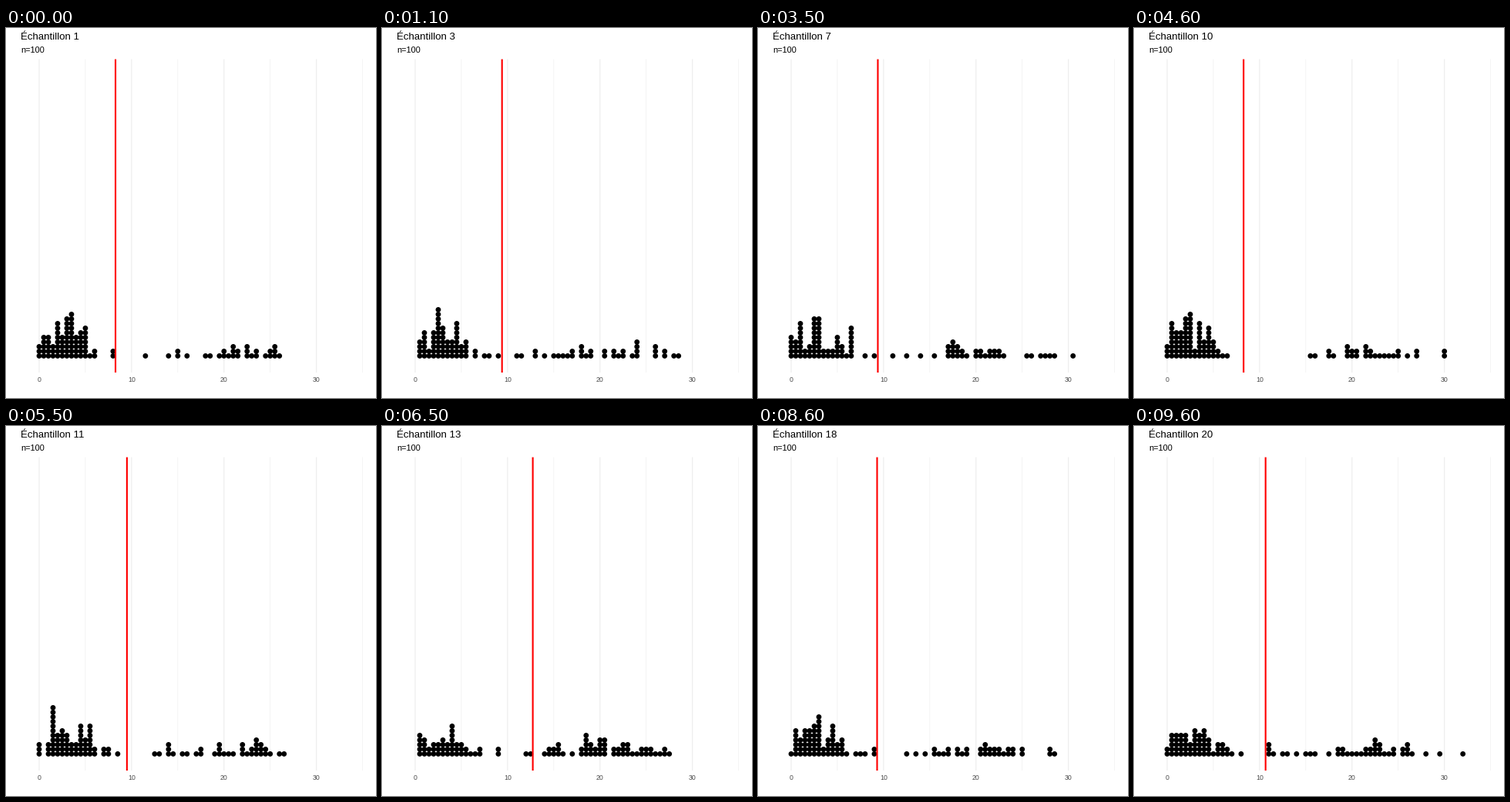
Animation, 480 px wide and 480 px high, one loop 10000 ms. Source, as a matplotlib script:

```python
import numpy as np
import matplotlib.pyplot as plt
from matplotlib.animation import FuncAnimation
from matplotlib.collections import PatchCollection
from matplotlib.patches import Circle

SIZE, DPI = 480, 100
PX = 72 / DPI                      # points per pixel
TOP, BOTTOM = 40.5, 447            # panel edges
BIN = 0.5                          # width of one dot column
DOT_STEP, DOT_RADIUS = 5.995, 3.4
FIRST_ROW = 425.4
FRAMES, HOLD = 100, 5              # frames per loop, frames per sample

MEANS = [8.26, 9.9, 9.4, 9.1, 8.63, 9.6, 8.9, 9.38, 9.8, 8.27,
         9.2, 9.5, 10.2, 12.73, 10.4, 10.52, 9.7, 9.3, 10.0, 10.65]


def x_px(value):
    return 43 + 11.99 * value


def draw_sample(number):
    """100 values in two groups, near 3 and near 20, with the wanted mean."""
    rng = np.random.default_rng(number)
    mean = MEANS[number - 1]
    n_low = round(100 * (20.3 - mean) / 17)
    low = np.minimum(np.abs(rng.normal(3, 2.4, n_low)), 9)
    high = rng.normal(20, 4.5, 100 - n_low)
    high += (100 * mean - low.sum()) / len(high) - high.mean()
    return np.r_[low, np.clip(high, 11, 33)]


def stack_dots(values):
    """Pile the values up in columns, one circle per value."""
    columns, counts = np.unique(np.rint(values / BIN), return_counts=True)
    return [Circle((x_px(column * BIN), FIRST_ROW - DOT_STEP * row), DOT_RADIUS)
            for column, count in zip(columns, counts) for row in range(count)]


stacks = [stack_dots(draw_sample(i + 1)) for i in range(len(MEANS))]

fig = plt.figure(figsize=(SIZE / DPI, SIZE / DPI), dpi=DPI, facecolor="white")
ax = fig.add_axes([0, 0, 1, 1])
ax.set(xlim=(0, SIZE), ylim=(SIZE, 0))
ax.axis("off")


def vline(x, width, color, z):
    return ax.plot([x, x], [TOP, BOTTOM], color=color, lw=width * PX, zorder=z,
                   solid_capstyle="butt", snap=False)[0]


def label(x, y, text, size, color="black", ha="left"):
    return ax.text(x, y, text, fontsize=size * PX, color=color, ha=ha,
                   va="baseline", family="Liberation Sans")


for tick in range(0, 36, 5):
    major = tick % 10 == 0
    vline(x_px(tick), 1.07 if major else 0.53, "#EBEBEB", 1)
    if major:
        label(x_px(tick), 459, str(tick), 8.8, "#4D4D4D", "center")

title = label(18.9, 15, "", 13.2)
label(18.8, 32, "n=100", 11)
dots = PatchCollection(stacks[0], facecolor="black", linewidth=0, zorder=2)
ax.add_collection(dots)
mean_line = vline(0, 2.13, "red", 3)


def update(frame):
    sample = frame // HOLD
    # The title follows the dots one frame late.
    title.set_text(f"Échantillon {max(frame - 1, 0) // HOLD + 1}")
    dots.set_paths(stacks[sample])
    x = x_px(MEANS[sample])
    mean_line.set_xdata([x, x])
    return title, dots, mean_line


anim = FuncAnimation(fig, update, frames=FRAMES, interval=100, repeat=True,
                     repeat_delay=0, blit=False)
plt.show()
```
